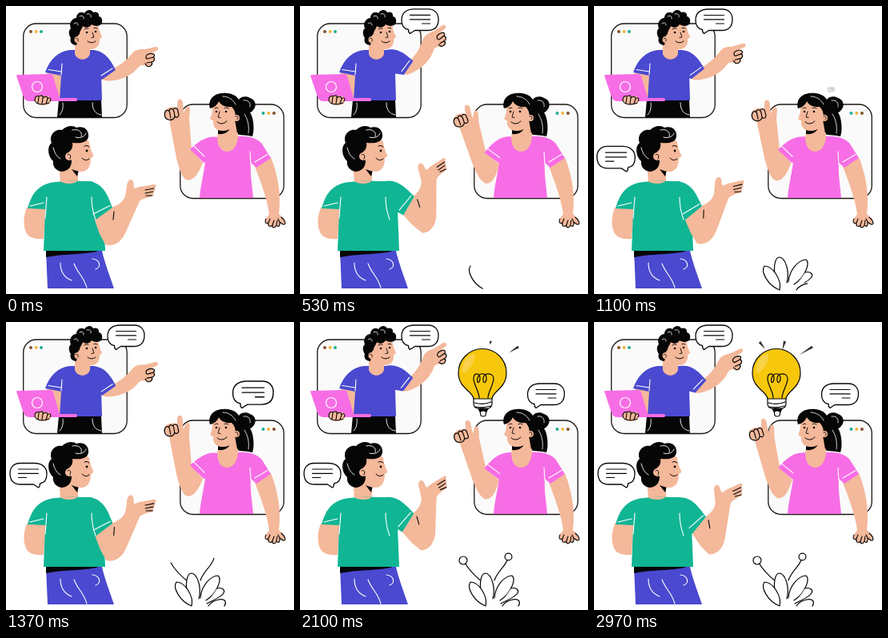
Recreate the animation shown at these times as an HTML page with a canvas. Size 360 by 360 pixels, loop 3 s.

```html
<!DOCTYPE html>
<html lang="en">
<head>
<meta charset="utf-8">
<title>Team call</title>
<style>
html, body { margin: 0; width: 100%; height: 100%; overflow: hidden; background: #fff; }
canvas { display: block; width: 360px; height: 360px; }
</style>
</head>
<body>
<canvas id="stage"></canvas>
<script>
const canvas = document.getElementById('stage');
const ctx = canvas.getContext('2d');
const dpr = window.devicePixelRatio || 1;
canvas.width = canvas.height = 360 * dpr;

const LOOP = 3000;
const SKIN = '#f4b89a', INK = '#060606', BLUE = '#4a49d0', PINK = '#f76de5',
      GREEN = '#10b594', YELLOW = '#f7c70c', TEAL = '#1fae92', BROWN = '#80502c', AMBER = '#f3b53c';

const cache = new Map();
function path(d) {
  if (!cache.has(d)) cache.set(d, new Path2D(d));
  return cache.get(d);
}
function fill(d, color) {
  ctx.fillStyle = color;
  ctx.fill(path(d));
}
function line(d, width = 1.2, color = INK) {
  ctx.strokeStyle = color;
  ctx.lineWidth = width;
  ctx.stroke(path(d));
}
function dot(x, y, r, color) {
  ctx.fillStyle = color;
  ctx.beginPath();
  ctx.arc(x, y, r, 0, Math.PI * 2);
  ctx.fill();
}
function group(draw) {
  ctx.save();
  draw();
  ctx.restore();
}
function turned(x, y, deg, draw) {
  group(() => {
    ctx.translate(x, y);
    ctx.rotate(deg * Math.PI / 180);
    ctx.translate(-x, -y);
    draw();
  });
}
function scaled(x, y, k, draw) {
  if (k <= 0) return;
  group(() => {
    ctx.translate(x, y);
    ctx.scale(k, k);
    ctx.translate(-x, -y);
    draw();
  });
}

const clamp = v => Math.min(1, Math.max(0, v));
const span = (t, a, b) => clamp((t - a) / (b - a));
const ease = u => (1 - Math.cos(Math.PI * u)) / 2;
function pop(t, start, time = 500) {
  const u = span(t, start, start + time) - 1;
  return u <= -1 ? 0 : 1 + 2.7 * u ** 3 + 1.7 * u * u;
}

// 0 = arms lowered, 1 = arms raised
const turns = [0, 550, 1290, 1975, 2660, 3190];
function swing(t) {
  let i = 0;
  while (t >= turns[i + 1]) i++;
  const u = ease(span(t, turns[i], turns[i + 1]));
  return i % 2 ? 1 - u : u;
}

function frame(x, y, dots) {
  ctx.beginPath();
  ctx.roundRect(x, y, 129.5, 117.5, 16);
  ctx.fillStyle = '#fafafa';
  ctx.fill();
  ctx.strokeStyle = '#1c1813';
  ctx.lineWidth = 1.3;
  ctx.stroke();
  dots.forEach(([dx, dy, c]) => dot(dx, dy, 2, c));
}

// Speech bubble anchored at the tip of its tail
function bubble(x, y, k, flip) {
  if (k <= 0) return;
  group(() => {
    ctx.translate(x, y);
    ctx.scale(flip ? -k : k, k);
    const body = 'M-1 -5C-7 -6 -9.5 -11 -9.5 -17C-9.5 -26 -3 -30.5 6 -30.5L24 -30.5C32 -30.5 36.5 -25 36.5 -18C36.5 -9 32 -4 23 -4L7 -4L1 0Q-1 -1 -1 -5Z';
    fill(body, '#fff');
    line(body, 1.3);
    line('M1 -23H26M1 -17.6H26M16 -12.5H26', 1.2);
  });
}

function host(s, t) {
  frame(21.7, 22, [[31, 32, BROWN], [37.7, 32, AMBER], [44, 32, TEAL]]);
  fill('M51 82L70 84L72 116L56 116C55 105 52 95 51 82Z', SKIN);
  fill('M66 117H119L120 139H64Z', INK);
  line('M71 121C72 128 70 133 67 136M108 121C108 130 112 135 119 136', .9, '#fff');
  fill('M80 55H110C117 59 120 70 119 84L120 118H67L69 87L49 83C55 66 65 57 80 55Z', BLUE);
  line('M53 79.5L69 82M70 72L69 86', 1.1, '#fff');

  // head
  fill('M86 44L86 60C89 69 102 69 105 60V54Z', SKIN);
  fill('M86 30C91 20 111 18 115 24C117 30 117 33 120 38C120 40 118 40 117 41C118 48 114 54 106 54C97 55 87 52 86 44Z', SKIN);
  fill('M88 49C83 49 79 45 81 40C78 36 78 30 81 28C78 21 83 15 88 15C88 9 94 6 98 9C101 4 107 4 109 8C114 6 117 10 116 13C121 14 121 20 119 23C115 26 110 25 107 23C105 27 99 28 96 25C95 29 92 31 92 35C90 36 89 38 90 40Z', INK);
  dot(89.5, 42, 4, SKIN);
  line('M87 41C89 39 91 41 90 44', .9);
  line('M92 13C95 11 98 13 97 16M101 10C105 9 107 11 106 14M85 22C88 20 90 21 90 24', .8, '#fff');
  dot(101, 33, 1.3, INK);
  dot(112, 32, 1.3, INK);
  line('M98 29Q101 27 103 28M110 27.5Q112 26.5 114 28M108 33L110 39L107 39.5', .9);
  line('M102 44Q107 48 112 44', 1);

  // laptop
  fill('M13 87Q13 86 15 86L55 85Q58 85 59 88L67 115H88Q90 117 88 119H30Q24 119 22 114Z', PINK);
  line('M32.5 101A6.5 6.5 0 0 1 45.5 101A6.5 6.5 0 0 1 32.5 101', 1.2, '#fff');
  fill('M36 118C36 113 40 111 45 112L53 113C57 114 57 120 54 122C50 125 39 125 36 118Z', SKIN);
  line('M37 120C34 115 39 111 41 113C44 111 47 112 46 115C49 112 52 113 52 116C55 113 57 116 55 119M41 114L40 121M46 115L45 122M52 116L50 122M38 121Q44 125 54 121', 1.1);

  bubble(136.5, 34.5, pop(t, 345), false);
  turned(108, 62, -20.5 * s, () => {
    fill('M118 90L134 78C145 73 152 66 158 59C162 54 168 54 174 54L187 51C191 51 191 55 188 56L178 60C184 58 188 61 184 64C187 66 185 70 182 70C184 73 180 77 176 75C172 74 169 73 166 76C158 86 146 92 134 93C127 94 122 94 118 90Z', SKIN);
    line('M178 60C184 58 188 61 184 64L177 66M184 64C187 66 185 70 182 70L176 71M182 70C184 73 180 77 176 75L174 72M178 60C175 61 174 64 176 66', 1.2);
    fill('M108 55C123 56 130 66 137 80L120 92L109 86Z', BLUE);
    line('M119 87L133 78', 1.1, '#fff');
  });
}

function speaker(s, t) {
  fill('M26 252C21 264 21 280 28 287C33 291 41 292 47 291L50 251Z', SKIN);
  fill('M50 306H120C123 320 130 338 135 353H52Z', BLUE);
  fill('M50 305H118C106 311 75 309 50 314Z', INK);
  line('M68 321C68 334 74 340 82 343M85 322C90 335 97 338 101 352M108 316C117 317 120 326 112 329', 1.1, '#fff');

  // head
  fill('M66 194L68 222H90L90 205Z', SKIN);
  fill('M82 204L91 205L89 213Z', INK);
  fill('M76 172C84 162 101 164 104 170C105 178 107 182 109 186C110 189 107 189 106 190C106 199 103 207 94 207C86 207 76 202 74 193Z', SKIN);
  fill('M70 207C62 206 58 200 59 194C52 188 51 175 57 171C53 161 62 153 70 155C76 149 84 149 88 152C96 149 104 154 103 163C102 171 93 172 83 171C84 176 82 180 79 182C76 186 79 191 82 193C82 201 78 206 70 207Z', INK);
  dot(79, 188, 5, SKIN);
  line('M77 186C80 184 82 187 80 191', 1);
  line('M83 155C91 153 96 158 94 163M87 164C93 166 99 163 100 159M59 177C61 184 63 188 68 191', .9, '#fff');
  dot(101, 181, 1.4, INK);
  line('M98 175Q101 173 104 176M95 190Q99 195 104 191', 1);

  fill('M62 220C76 218 96 219 106 219C118 222 123 238 122 256L124 306H47L49 254L27 253C31 240 37 222 62 220Z', GREEN);
  fill('M68 219H89C86 223 72 223 68 219Z', SKIN);
  line('M30 250L47 246M51 239L49 265', 1.1, '#fff');
  turned(105, 222, -24 * s, () => {
    fill('M110 258L111 268L117 285L124 298C134 302 144 295 149 284L167 244C172 239 181 240 183 237C186 235 184 233 184 232C187 231 187 229 185 228C189 226 188 223 185 223L167 226L161 228C158 226 161 221 158 218C155 215 151 220 151 226L149 238C145 247 138 250 131 252Z', SKIN);
    line('M185 228L174 230M184 232L174 234M183 237L175 237', 1.1);
    line('M135 257L134 267', 1.1);
    fill('M100 219C121 219 127 236 133 252L111 268L100 254Z', GREEN);
    line('M109 260L130 249.5', 1.1, '#fff');
  });
  line('M107 239C107 251 109 259 112 267', 1.1, '#fff');
  bubble(41.5, 207, pop(t, 685), true);
}

function guest(s, t) {
  frame(217.8, 123, [[321.5, 134, TEAL], [328.3, 134, AMBER], [335, 134, BROWN]]);
  // ponytail
  fill('M286 128C298 124 306 131 308 140C310 148 310 157 308 163C302 161 293 162 288 160Z', INK);
  line('M298 135C303 143 304 151 303 159', .8, '#fff');

  // lowered arm
  fill('M310 198L331 189C341 213 344 240 341 260C346 264 350 269 349 272C347 275 344 271 342 270C343 275 340 277 338 274C336 278 333 278 333 274C330 277 327 275 328 271C324 273 323 269 325 266L329 260C327 243 319 221 310 198Z', SKIN);
  line('M330 266L328 271C327 275 330 277 333 274L335 268M333 274C333 278 336 278 338 274L339 268M338 274C340 277 343 275 342 270L340 266M342 270C344 271 347 275 349 272Q349 268 344 264M328 271C324 273 323 269 325 266', 1.1);

  // raised arm
  const lift = draw => turned(258, 178, -9 * s, draw);
  lift(() => {
    fill('M246 196C240 211 233 220 225 217C219 213 216 202 213 190L204 142C198 141 197 135 199 130C203 126 209 125 214 128L214.5 119C215.5 115 220 116 221 120L222 134L225 127C227 124 230 126 230 129L229 141L232 180Z', SKIN);
    line('M203 142C198 141 197 134 200 131C203 129 205 132 205 135L206 140M204 131C205 127 209 128 210 132L211 138M209 129C212 126 215 128 215 132L216 136M203 142C207 143 210 142 211 138C213 140 216 139 216 136', 1.2);
  });

  fill('M265 164C272 160 282 162 290 163C306 162 317 167 321 174L331 190L313 202L306 196C305 211 308 226 309 240H242C243 226 247 210 249 195L248 174Z', PINK);
  lift(() => {
    fill('M266 164C251 161 240 170 230 179L247 196L262 190Z', PINK);
    line('M235 175L248 188', 1.1, '#fff');
  });
  line('M311 195L327 185.5M305 182L306 198', 1.1, '#fff');

  // head
  fill('M267 148L264 163C264 177 270 182 277 182C285 181 289 174 290 163V142Z', SKIN);
  fill('M265 152C272 156 278 154 280 151C280 157 273 161 265 160Z', INK);
  fill('M258 120C268 113 285 118 289 128C291 143 286 155 272 156C263 157 258 151 259 143C257 143 254 141 256 139L258 132Z', SKIN);
  fill('M255 128C252 118 259 109 271 109C281 108 288 112 291 117C293 113 301 112 305 115C312 117 314 125 309 130C306 135 299 135 296 132C297 145 294 154 289 159L286 142C288 135 286 130 282 126C273 127 268 123 266 119C264 124 260 127 255 128Z', INK);
  dot(288, 140, 4, SKIN);
  line('M287 138C290 137 291 140 289 142', .9);
  line('M271 113C278 113 284 117 287 123M297 118C303 117 306 121 305 126', .8, '#fff');
  dot(263, 132, 1.3, INK);
  dot(275, 132, 1.3, INK);
  line('M261 128Q263 126 265 127.5M273 127.5Q276 126 278 128M267 132L265 139L268 139.5', .9);
  line('M264 145Q270 150 276 144', 1);
  bubble(294, 107.5, pop(t, 1080), false);
}

// Tapered dash that grows outwards, then empties from its inner end
function ray(x1, y1, x2, y2, end, v) {
  const a = span(v, .4, end), b = span(v, .15, .33);
  if (b <= a) return;
  const at = u => [x1 + (x2 - x1) * u, y1 + (y2 - y1) * u];
  const [ax, ay] = at(a), [bx, by] = at(b);
  const k = 1.6 / Math.hypot(x2 - x1, y2 - y1);
  const nx = (y1 - y2) * k, ny = (x2 - x1) * k;
  ctx.fillStyle = '#2b2925';
  ctx.beginPath();
  ctx.moveTo(ax, ay);
  ctx.lineTo(bx + nx, by + ny);
  ctx.lineTo(bx - nx, by - ny);
  ctx.fill();
}

function bulb(t) {
  scaled(229, 118, pop(t, 1500), () => {
    fill('M217 95H240V103C240 107 237 109 235 109L232 117Q229 119 226 117L223 109C219 109 217 106 217 103Z', '#fff');
    const glass = 'M217 96C216 86 198 83 198 63.5A30 30 0 0 1 258 63.5C258 83 241 86 240 96Z';
    fill(glass, YELLOW);
    fill('M203 59C203 47 211 40 218 40C219 49 213 59 205 64Q203 62 203 59Z', '#f9d24a');
    line(glass, 1.2);
    line('M224 95C224 87 217 78 217 71C217 63 225 63 225 70C225 78 220 77 222 70C224 63 233 63 233 70C233 78 228 77 229 70C230 63 242 63 242 71C242 78 235 87 235 95', 1.2);
    line('M217 96V102Q217 107 222 108H235Q240 107 240 102V96M218 101Q229 104 239 100M219 106Q229 108 238 105', 1.2);
    fill('M222 108H236L233 113Q229 110 225 113Z', INK);
    line('M225 111L226 117Q229 119 232 117L233 111', 1.2);
  });
  if (t < 1495) return;
  const v = (t - 1495) % 1100 / 1100;
  ray(214, 34, 207, 25, .55, v);
  ray(235.5, 35, 238.5, 24, .65, v);
  ray(257, 41, 273, 31, 1, v);
}

// Outline that draws itself as p runs from 0 to 1
function trace(d, length, p, solid) {
  if (p <= 0) return;
  if (solid) fill(d, '#fff');
  ctx.setLineDash(p < 1 ? [length * p, length * 2] : []);
  line(d, 1.2);
  ctx.setLineDash([]);
}

function plant(t) {
  const stem = ease(span(t, 1130, 1420));
  trace('M228 325C218 317 209 307 205 299', 35, stem);
  trace('M243 323C247 311 257 306 260 295', 35, stem);
  [[204, 298, 5], [260.5, 293.5, 4.4]].forEach(([x, y, r]) => scaled(x, y, pop(t, 1400, 350), () => {
    dot(x, y, r + .6, INK);
    dot(x, y, r - .6, '#fff');
  }));
  trace('M243 345C244 331 254 318 265 317C270 321 265 338 250 348', 66, ease(span(t, 560, 860)), true);
  trace('M228 343C223 328 226 314 232 314C239 315 245 331 241 346', 70, ease(span(t, 510, 850)), true);
  trace('M213 325C208 332 217 349 232 355C235 343 224 325 213 325', 72, ease(span(t, 330, 740)), true);
  trace('M264 333C271 331 275 336 271 340C267 345 258 348 251 352', 32, ease(span(t, 900, 1200)), true);
  trace('M253 355C257 348 271 344 274 349Q275 353 273 355', 32, ease(span(t, 950, 1250)), true);
}

function render(t) {
  ctx.setTransform(dpr, 0, 0, dpr, 0, 0);
  ctx.fillStyle = '#fff';
  ctx.fillRect(0, 0, 360, 360);
  ctx.lineCap = ctx.lineJoin = 'round';
  const s = swing(t);
  host(s, t);
  bulb(t);
  guest(s, t);
  speaker(s, t);
  plant(t);
}

const start = performance.now();
function tick() {
  render((performance.now() - start) % LOOP);
  requestAnimationFrame(tick);
}
tick();
</script>
</body>
</html>
```
